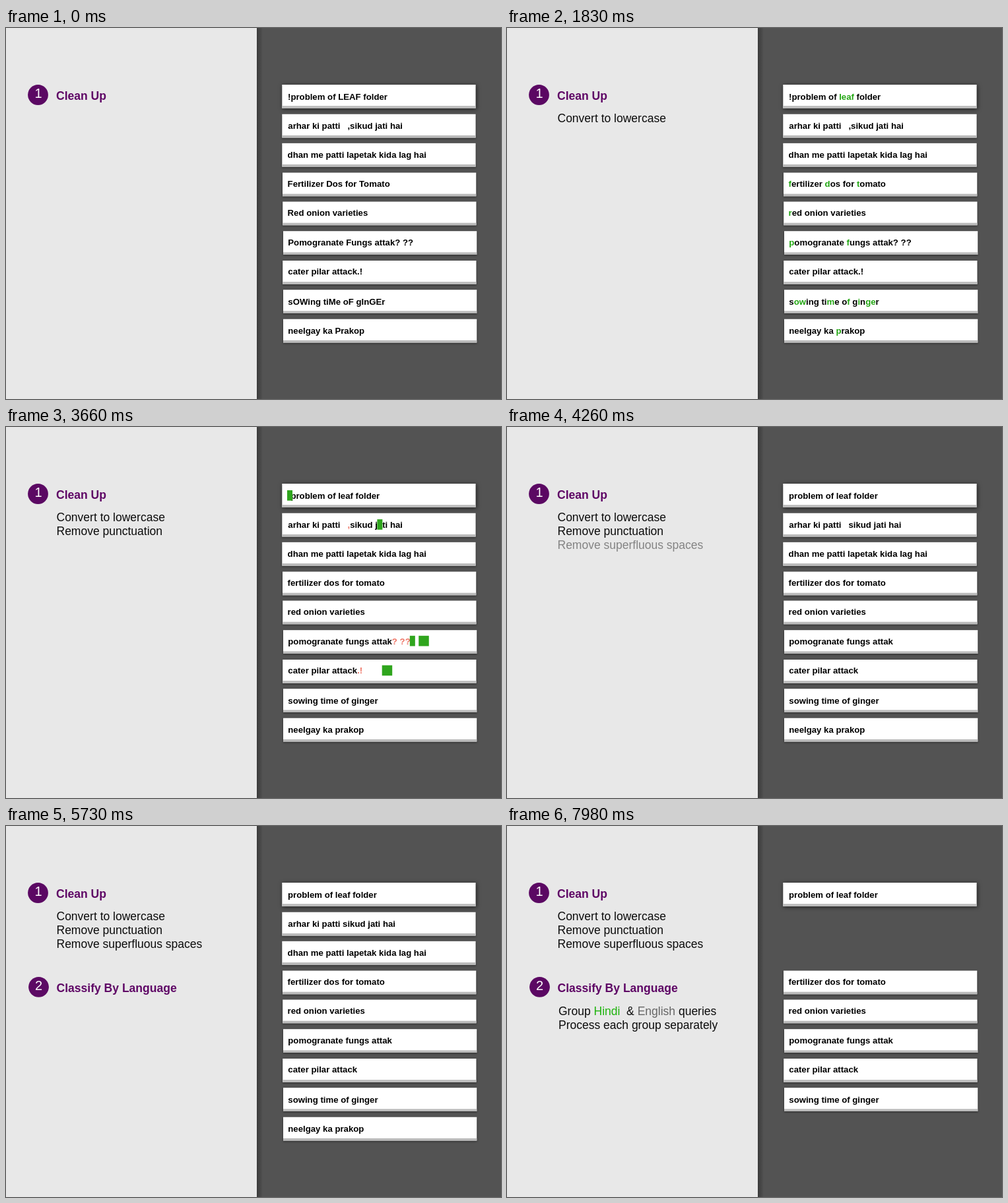
Animation, 750 px wide and 563 px high, one loop 8000 ms. Source, as an HTML page:

```html
<!DOCTYPE html>
<html>
<head>
<meta charset="utf-8">
<style>
  html, body { margin: 0; width: 100%; height: 100%; overflow: hidden; background: #e8e8e8; }
  svg { display: block; width: 750px; height: 563px; font-family: "Liberation Sans", Arial, sans-serif; }
  text { white-space: pre; }
  .body { font-size: 17.5px; fill: #0c0c0c; }
  .title { font-size: 17.55px; font-weight: bold; fill: #5e0565; }
  .digit { font-size: 20px; fill: #fff; text-anchor: middle; }
  .query { font-size: 13.2px; font-weight: bold; fill: #000; }
  .card { filter: drop-shadow(0 1px 1.5px rgba(0, 0, 0, .5)); }
  .card.first { filter: drop-shadow(1px 1px 3px rgba(0, 0, 0, .65)); }
</style>
</head>
<body>
<svg viewBox="0 0 750 563">
  <defs>
    <linearGradient id="fold">
      <stop offset="0" stop-color="#3b3b3b"/>
      <stop offset=".6" stop-color="#484848"/>
      <stop offset="1" stop-color="#535353"/>
    </linearGradient>
  </defs>
  <rect width="750" height="563" fill="#e8e8e8"/>
  <rect x="380" width="370" height="563" fill="#535353"/>
  <rect x="380" width="9" height="563" fill="url(#fold)"/>
  <circle cx="48.5" cy="101.5" r="15.4" fill="#5b0863"/>
  <text class="digit" x="49" y="106">1</text>
  <text class="title" x="76" y="109">Clean Up</text>
  <text class="body" x="76.5" y="143" data-in="900">Convert to lowercase</text>
  <text class="body" x="76.5" y="164" data-in="2550">Remove punctuation</text>
  <text class="body" x="76.5" y="185" data-in="4120">Remove superfluous spaces</text>
  <g data-in="5450">
    <circle cx="49.5" cy="244.3" r="15.4" fill="#5b0863"/>
    <text class="digit" x="49.5" y="249">2</text>
    <text class="title" x="76.5" y="252">Classify By Language</text>
  </g>
  <text class="body" x="78" y="286.5" data-in="5850">Group <tspan fill="#1eb30c">Hindi</tspan>  &amp; <tspan fill="#666">English</tspan> queries</text>
  <text class="body" x="78" y="307.5" data-in="6850">Process each group separately</text>
  <g id="cards"></g>
  <g id="blocks"></g>
</svg>
<script>
const LOOP = 8000;
const GREEN = '#22a612', RED = '#ee7465';
const LOWER = 1400, PLAIN = 2250, MARK = 2950, STRIP = 3880, SQUEEZE = 5020;
const HINDI = 6250, LEAVE = 6980;

// text, card x, card y, text x, baseline, is Hindi
const queries = [
  ['!problem of LEAF folder', 418.3, 86, 427, 108.7],
  ['arhar ki patti   ,sikud jati hai', 418.3, 130.7, 427.3, 152.8, true],
  ['dhan me patti lapetak kida lag hai', 418.3, 174.8, 426.6, 196.8, true],
  ['Fertilizer Dos for Tomato', 419, 219.5, 426.6, 241],
  ['Red onion varieties', 419.2, 263.5, 426.6, 285],
  ['Pomogranate Fungs attak? ??', 420, 308.2, 427.3, 329.5],
  ['cater pilar attack.!', 419.2, 353, 427.3, 374.3],
  ['sOWing tiMe oF gInGEr', 420, 397.2, 427.3, 419.5],
  ['neelgay ka Prakop', 420, 441.7, 427.3, 463.7, true]
];

// row, width, destination x, start time, end time, colour
const sweeps = [
  [0, 8, 426, 3100, 3600],
  [1, 8, 516, 3320, 3820],
  [5, 8, 581, 3320, 3820],
  [5, 15.5, 601, 3320, 3820],
  [6, 15.5, 528, 3320, 3820],
  [1, 20, 502, 4470, 4970, RED]
];

const clamp = v => Math.min(1, Math.max(0, v));
const smooth = u => u * u * (3 - 2 * u);
const ramp = (t, start, end) => smooth(clamp((t - start) / (end - start)));

function add(parent, tag, attrs) {
  const node = document.createElementNS('http://www.w3.org/2000/svg', tag);
  for (const key in attrs) node.setAttribute(key, attrs[key]);
  return parent.appendChild(node);
}

const tint = (s, color) => `<tspan fill="${color}">${s}</tspan>`;

function stages(raw) {
  const lower = raw.toLowerCase();
  const stripped = lower.replace(/[^\w\s]/g, '');
  return [
    [0, raw],
    [LOWER, raw.replace(/[A-Z]+/g, s => tint(s.toLowerCase(), GREEN))],
    [PLAIN, lower],
    [MARK, lower.replace(/[^\w\s]+/g, s => tint(s, RED))],
    [STRIP, stripped],
    [SQUEEZE, stripped.replace(/ +/g, ' ')]
  ];
}

const cardLayer = document.getElementById('cards');
const cards = queries.map(([raw, x, y, textX, baseline, hindi], i) => {
  const group = add(cardLayer, 'g', {});
  const paper = add(group, 'g', { class: i ? 'card' : 'card first' });
  add(paper, 'rect', { x, y, width: 293.3, height: 35.8, fill: '#fff' });
  const strip = { x, y: y + 32.2, width: 293.3, height: 3.6 };
  add(paper, 'rect', { ...strip, fill: '#bbb' });
  const place = { class: 'query', x: textX, y: baseline };
  const label = add(group, 'text', place);
  let accent = null;
  if (hindi) {
    accent = add(group, 'g', { opacity: 0 });
    add(accent, 'rect', { ...strip, fill: GREEN });
    const copy = add(accent, 'text', { ...place, style: `fill:${GREEN}` });
    copy.textContent = stages(raw)[5][1];
  }
  return { group, label, accent, steps: stages(raw), shown: null };
});

const blockLayer = document.getElementById('blocks');
const blocks = sweeps.map(([row, width, to, start, end, fill = '#2fa51d']) => ({
  node: add(blockLayer, 'rect', { y: queries[row][4] - 12.7, width, height: 15.7, fill }),
  from: 718 - width, to, start, end, gone: fill === RED ? SQUEEZE : STRIP
}));

const reveals = [...document.querySelectorAll('[data-in]')];

function draw(t) {
  for (const node of reveals) {
    const start = +node.dataset.in;
    node.setAttribute('opacity', ramp(t, start, start + 300));
  }
  for (const card of cards) {
    const markup = card.steps.filter(([start]) => t >= start).pop()[1];
    if (markup !== card.shown) card.label.innerHTML = card.shown = markup;
    if (!card.accent) continue;
    const green = ramp(t, HINDI, HINDI + 250);
    card.accent.setAttribute('opacity', green);
    card.label.setAttribute('opacity', 1 - green);
    card.group.setAttribute('opacity', 1 - ramp(t, LEAVE, LEAVE + 300));
  }
  for (const b of blocks) {
    b.node.setAttribute('x', b.from + (b.to - b.from) * ramp(t, b.start, b.end));
    b.node.setAttribute('opacity', t >= b.start && t < b.gone ? 1 : 0);
  }
}

function frame() {
  draw(performance.now() % LOOP);
  requestAnimationFrame(frame);
}
frame();
</script>
</body>
</html>
```
